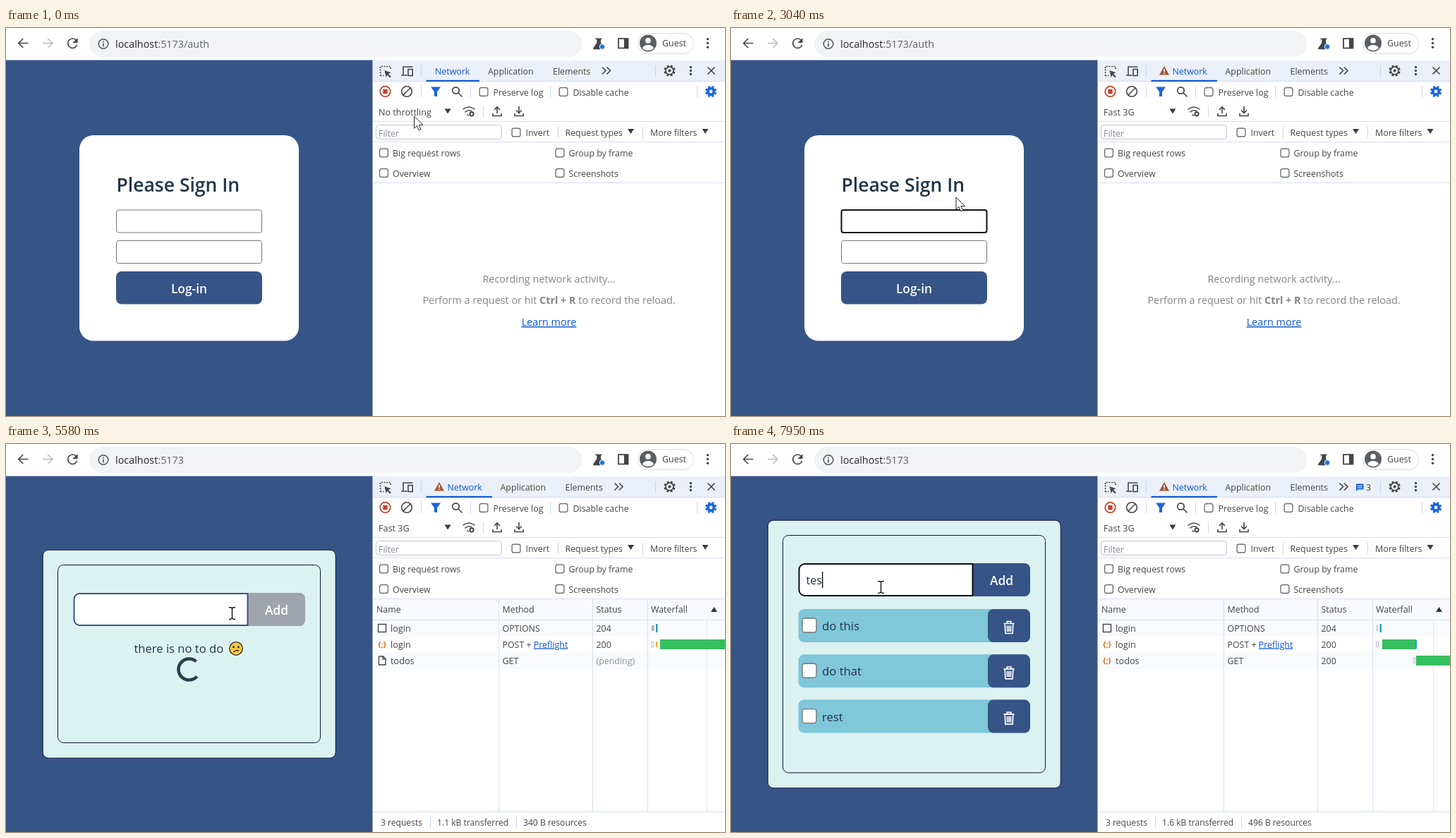
Animation, 1019 px wide and 550 px high, one loop 8000 ms. Source, as an HTML page:

```html
<!DOCTYPE html>
<html lang="en">
<head>
<meta charset="utf-8">
<title>Sign in and to-do list</title>
<style>
html, body { margin: 0; width: 100%; height: 100%; overflow: hidden; background: #fff; }
svg { display: block; width: 100vw; height: 100vh; }
text { font-family: "Open Sans", "Noto Sans", sans-serif; font-size: 12.4px; fill: #444; white-space: pre; }
.line { fill: none; stroke: #444; stroke-width: 1.6; }
.b { font-weight: 700; }
.semi { font-weight: 600; }
</style>
</head>
<body>
<svg id="stage" viewBox="0 0 1019 550"></svg>
<script>
const LOOP = 8000;
const NAVY = '#365486', MINT = '#dcf2f1', SKY = '#7fc7d9', INK = '#213547', EDGE = '#0f1035';
const BLUE = '#0b57d0', GREEN = '#34bf5e', GREY = '#a0a5ad', RULE = '#d5dff1';
const $ = id => document.getElementById(id);

// Drawing helpers
const text = (x, y, s, attrs = '') => `<text x="${x}" y="${y}" ${attrs}>${s}</text>`;
const rect = (x, y, w, h, fill, attrs = '') =>
  `<rect x="${x}" y="${y}" width="${w}" height="${h}" fill="${fill}" ${attrs}/>`;
const line = (d, attrs = '') => `<path class="line" d="${d}" ${attrs}/>`;
const shape = (d, fill, attrs = '') => `<path d="${d}" fill="${fill}" ${attrs}/>`;
const disc = (x, y, r, fill, attrs = '') => `<circle cx="${x}" cy="${y}" r="${r}" fill="${fill}" ${attrs}/>`;
const ring = (x, y, r, color, w) => disc(x, y, r, 'none', `stroke="${color}" stroke-width="${w}"`);
const split = (x, y, h = 16) => rect(x, y, 1, h, '#c6d8f5');
const check = (x, y) => rect(x + .6, y + .6, 11.8, 11.8, '#fff', 'rx="2.5" stroke="#5a5d61" stroke-width="1.2"');
const option = (x, y, s, gap = 20) => check(x, y) + text(x + gap, y + 11.5, s);
const tri = (x, y) => shape(`M${x} ${y}h9l-4.5 7z`, '#3c3c3c');
const dots = (x, y, step) => [-step, 0, step].map(d => disc(x, y + d, 1.7, '#444')).join('');
const gear = (x, y, color, w) => ring(x, y, 6.2 - w / 2, color, w) +
  disc(x, y, 7, 'none', `stroke="${color}" stroke-width="2.4" stroke-dasharray="3 2.5" transform="rotate(10 ${x} ${y})"`) +
  (w < 3 ? disc(x, y, 2, color) : '');

const browserBar = () => rect(0, 0, 1019, 45.5, '#fff') + rect(118, 4, 698, 37, '#f1f3f4', 'rx="18.5"') +
  line('M31.5 21.5H18M24.3 15l-6.6 6.5 6.6 6.5') +
  line('M52 21.5h13.5M59.2 15l6.6 6.5-6.6 6.5', 'style="stroke:#b9bcc0"') +
  line('M99.5 17.5a6.7 6.7 0 1 0 1.2 6.2') + shape('M101.5 14v7h-7z', '#444') +
  ring(138, 22.5, 6.8, '#50545a', 1.5) + rect(137.2, 21.5, 1.6, 5, '#50545a') + rect(137.2, 18.5, 1.6, 1.7, '#50545a') +
  `<text x="155" y="27.5" style="font-size:14.4px;fill:#27292c">localhost<tspan id="path" fill="#5f6368"></tspan></text>` +
  shape('M835.5 14.5h9v1.8h-1.5v4.7l5 7q1 2-1 2.2h-13.5q-2.5-.2-1-2.2l4.8-7v-4.7h-1.8z', '#42464b') +
  disc(845, 26.5, 3.8, '#1a73e8', 'stroke="#fff" stroke-width="1"') +
  rect(868, 15, 13.5, 13.5, 'none', 'stroke="#444" stroke-width="1.8"') + rect(876, 15, 5.5, 13.5, '#444') +
  rect(895.5, 7.5, 79, 29, '#fff', 'rx="14.5" stroke="#dadce0"') +
  disc(910, 21.5, 12, '#5a5e63') + disc(910, 17.8, 3.9, '#fff') + shape('M902 28.5q2-4.5 8-4.5t8 4.5q-3 3.2-8 3.2t-8-3.2z', '#fff') +
  text(930, 26, 'Guest') + dots(994.5, 21.5, 5.7);

const devtools = () => rect(519.5, 45, 500, 505, '#fff') + rect(520, 46, 499, 29.5, '#ebeff7') +
  [75, 132, 161, 219].map(y => rect(520, y, 499, 1, RULE)).join('') +
  line('M530.5 68v-13.5h14.5v4M530.5 67.5h5', 'stroke-dasharray="2 1.7"') +
  shape('M536.5 60l9 3.2-3.6 1.7 4 4-1.5 1.5-4-4-1.7 3.5z', '#444') +
  line('M563 66v-11h13.5M560 67h8.5') + rect(570, 58.5, 6.2, 9, 'none', 'stroke="#444" stroke-width="1.6"') +
  split(588, 53) + split(920, 53) +
  `<g id="tabs">` + text(608, 65.5, 'Network', `style="fill:${BLUE}"`) + text(683, 65.5, 'Application') +
  text(775, 65.5, 'Elements') + line('M845 55.5l5 5-5 5M851.5 55.5l5 5-5 5') + '</g>' +
  `<g id="warn">` + shape('M614 54l7 12.5h-14z', '#a4573a') + rect(613.3, 58, 1.5, 4.3, '#fff') + rect(613.3, 63.5, 1.5, 1.5, '#fff') + '</g>' +
  `<rect id="underline" x="595.5" y="73.8" height="2.2" fill="${BLUE}"/>` +
  `<g id="issues">` + shape('M886 56.5h10.5v8h-8l-2.5 2.5z', '#1a66e0') + line('M888 59.3h6.5M888 61.9h6.5', 'style="stroke:#fff;stroke-width:1"') +
  text(900, 66, '3') + '</g>' +
  gear(940.5, 60.5, '#444', 1.6) + dots(970.5, 60.5, 5) + line('M994.5 55.5l10 10m0-10l-10 10') +
  // Recording toolbar
  ring(537.5, 90, 7.3, '#c0432d', 1.7) + rect(534.3, 86.8, 6.4, 6.4, '#c0432d', 'rx="1"') +
  ring(568, 90, 7.3, '#444', 1.6) + line('M573.2 84.8l-10.4 10.4') +
  shape('M602 83.5h14l-5 7v6.5h-4v-6.5z', '#1a66e0') +
  ring(637.5, 88.5, 4.7, '#444', 1.7) + line('M641 92l5.5 5.5') +
  split(588, 82) + split(658, 82) + split(771, 82) + split(979, 82) +
  option(670.5, 84, 'Preserve log') + option(783.5, 84, 'Disable cache') + gear(999, 90, '#1a66e0', 3.8) +
  rect(522, 106, 112, 25, '#efefef', 'id="selectHover"') +
  `<text id="speed" x="528" y="123.5" style="font-size:12.6px"></text>` + tri(621.5, 114.5) +
  line('M647.5 115.5q8.5-7 17 0M650.5 119.3q5.5-4.5 10-1M653.5 122.5l2.5 2') +
  ring(660, 121.8, 2.6, '#444', 2) + split(676, 110) +
  line('M696 121v-8.5M692 116l4-4 4 4M690 121v3.5h12v-3.5') + line('M727 111v9M723 116.5l4 4 4-4M721 121v3.5h12v-3.5') +
  // Filters
  rect(524.5, 137.5, 178, 20, '#fff', 'rx="4" stroke="#c3c7cd"') + text(528, 153.5, 'Filter', 'style="fill:#85898e"') +
  option(716.5, 141.5, 'Invert') + split(782, 140) + text(792.5, 153, 'Request types') + tri(881, 143) +
  split(902, 140) + text(913, 153, 'More filters') + tri(986.5, 143) +
  option(529, 170.5, 'Big request rows', 19) + option(778.5, 170.5, 'Group by frame', 19) +
  option(529, 199, 'Overview', 19) + option(778.5, 199, 'Screenshots', 19) +
  `<g id="empty" text-anchor="middle">` +
  [[360.5, 'Recording network activity…', '#808488'],
   [391, 'Perform a request or hit <tspan class="b">Ctrl + R</tspan> to record the reload.', '#808488'],
   [422, 'Learn more', BLUE + ';text-decoration:underline']].map(([y, s, c]) =>
    text(769.5, y, s, `style="font-size:14.4px;fill:${c}"`)).join('') + '</g>' +
  `<g id="table"></g>`;

const loginPage = () => `<g id="login">` + rect(104, 152, 311, 291.5, '#fff', 'rx="20"') +
  text(156.5, 231.5, 'Please Sign In', `class="semi" style="font-size:26.5px;fill:${INK}"`) +
  [258, 301.5].map((y, i) => rect(156.5, y, 206, 32, '#fff', `id="field${i}" rx="3"`)).join('') +
  `<text id="user" x="161" y="280.5" style="font-size:16.2px;fill:#111"></text><g id="secret"></g>` +
  rect(156, 345, 207, 46.5, NAVY, 'rx="8"') +
  text(259.5, 375.5, 'Log-in', 'class="semi" text-anchor="middle" style="font-size:17.4px;fill:#fff"') + '</g>';

const trash = (x, y) => `<g transform="translate(${x} ${y})">` +
  line('M-7.5-5.5h15M-2.8-6v-2.3h5.6v2.3M-5.8-4.5l.7 13h10.2l.7-13M-2.6-2.5l.3 8.5M0-2.5v8.5M2.6-2.5l-.3 8.5',
    'style="stroke:#fff;stroke-width:1.7"') + '</g>';

const item = (name, i) => {
  const y = 234 + i * 64.3;
  return rect(95.5, y, 328.5, 47, SKY, 'rx="8"') + rect(364, y, 60, 47, NAVY, 'rx="8"') +
    rect(101, y + 13, 20, 20, '#fff', 'rx="3.5" stroke="#767676" stroke-width="1.4"') +
    text(129, y + 30, name, `style="font-size:16.7px;fill:${INK}"`) + trash(394, y + 26);
};

const worriedFace = (x, y) => disc(x, y, 9.3, '#fcc93c', 'stroke="#2b2b2b" stroke-width="1.3"') +
  disc(x - 3.4, y - 2.2, 1.5, '#2b2b2b') + disc(x + 3.4, y - 2.2, 1.5, '#2b2b2b') +
  line(`M${x - 3.5} ${y + 5}q3.5-3.5 7.5-2`, 'style="stroke:#2b2b2b"');

const todoPage = () => `<g id="todo">` +
  `<rect id="panel" x="52.2" y="108.2" width="415" rx="8" fill="${MINT}" stroke="${EDGE}"/>` +
  `<rect id="inner" x="73.5" y="129.5" width="372" rx="8" fill="none" stroke="${EDGE}"/>` +
  `<path id="add" d="M343 169h73a8 8 0 0 1 8 8v31a8 8 0 0 1-8 8h-73z"/>` +
  `<path id="entry" d="M342.5 170H104.5a8 8 0 0 0-8 8v29a8 8 0 0 0 8 8h238z" fill="#fff" stroke-width="2"/>` +
  text(383.5, 199.5, 'Add', 'class="semi" text-anchor="middle" style="font-size:17.3px;fill:#fff"') +
  `<text id="draft" x="106.5" y="199" style="font-size:16.2px;fill:${INK}"></text>` +
  `<g id="list">` + ['do this', 'do that', 'rest'].map(item).join('') + '</g>' +
  `<g id="loading">` + text(181.5, 254, 'there is no to do', `style="font-size:16.6px;fill:${INK}"`) + worriedFace(326, 248) +
  disc(259.5, 277.5, 15, 'none', `id="spinner" stroke="#2c3e50" stroke-width="4.6" pathLength="360" stroke-dasharray="270 90"`) + '</g></g>';

const choices = ['Disabled', 'No throttling', 'Presets', 'Fast 3G', 'Slow 3G', 'Offline', 'Custom', 'Add…'];
const headings = [0, 2, 6];
const choice = (s, i) => headings.includes(i)
  ? text(530, 144 + i * 18.17, s, 'class="b"')
  : text(543, 144 + i * 18.17, s, `id="choice${i}" style="font-size:12.6px"`);
const menu = () => `<g id="menu">` +
  rect(522.5, 129.5, 110, 147, '#fff', 'stroke="#7b7b7b" style="filter:drop-shadow(2px 2px 2px #0004)"') +
  `<rect id="pick" x="523" width="109" height="18.2" fill="#1765cf"/>` + choices.map(choice).join('') + '</g>';

$('stage').innerHTML = rect(0, 45, 520, 505, NAVY) + browserBar() + devtools() + loginPage() + todoPage() + menu() +
  rect(0, 0, 1.3, 23, '#000', 'id="caret"') + disc(0, 0, 13, '#dcdb20', 'id="halo" fill-opacity=".78"') +
  shape('M0 0V17.2l4-3.7 2.7 6.3 2.9-1.2-2.7-6.2h5.6z', '#fff', 'id="arrow" stroke="#222" stroke-width="1"') +
  `<path id="beam" d="M-4.5-8.5q4.5 0 4.5 2v13q0 2 4.5 2M4.5-8.5q-4.5 0-4.5 2v13q0 2-4.5 2" fill="none" stroke="#111" stroke-width="1.4"/>`;

// Network table
const marks = {
  box: y => rect(527.5, y - 5.5, 11, 11, 'none', 'stroke="#444" stroke-width="1.4"'),
  json: y => text(533, y + 3.6, '{;}', 'class="b" text-anchor="middle" style="font-size:11px;fill:#d9772b"'),
  page: y => line(`M528.5 ${y - 6}h6l3.5 3.5v8.5h-9.5zM534 ${y - 6}v4h4`, 'style="stroke-width:1.3"')
};

function table(stage, hover) {
  const done = stage == 3, wait = '(pending)';
  const rows = [
    ['box', 'login', 'OPTIONS', stage == 1 ? wait : 204],
    [stage == 1 ? 'page' : 'json', 'login', `POST + <tspan fill="${BLUE}" text-decoration="underline">Preflight</tspan>`, stage == 1 ? wait : 200],
    [done ? 'json' : 'page', 'todos', 'GET', done ? 200 : wait]
  ].slice(0, stage == 1 ? 2 : 3);
  const totals = [['0 B', '0 B'], ['1.1 kB', '340 B'], ['1.6 kB', '496 B']][stage - 1];
  const queue = (x, y) => rect(x + .5, y - 3.5, 3, 7, '#fff', 'stroke="#b9bdc2"');
  let out = rect(520, 220, 499, 330, '#fff') + rect(520, 220, 499, 29, '#f7f9fe');
  rows.forEach((r, i) => {
    const fill = i == hover ? '#f0f0f0' : i % 2 ? '#fff' : '#f8fafe';
    out += rect(520, 249.5 + i * 23, 499, 23, fill);
  });
  out += [698, 831, 909].map(x => rect(x, 220, 1, 301, RULE)).join('') + rect(done ? 995 : 993, 250, 1, 271, '#e2e8f3') +
    rect(520, 249, 499, 1, RULE) + rect(520, 521, 499, 1, RULE) +
    [[525, 'Name'], [703.5, 'Method'], [836.5, 'Status'], [914, 'Waterfall']].map(([x, s]) => text(x, 238.5, s)).join('') +
    shape('M999 238h9l-4.5-7z', '#333');
  rows.forEach(([mark, name, method, status], i) => {
    const y = 261 + i * 23;
    out += marks[mark](y) + text(545, y + 4.5, name, 'style="font-size:12.7px"') +
      text(703.5, y + 4.5, method) + text(836.5, y + 4.5, status, status == wait ? 'style="fill:#8d9196"' : '');
  });
  if (stage == 2) out += rect(915, 257, 3.5, 8, '#a9adb2') + rect(921, 255, 2.5, 12, '#2a9db5') +
    queue(914.5, 284) + rect(921, 280, 2, 8, '#f2a73b') + rect(927, 277, 92, 14, GREEN);
  if (done) out += rect(915, 257, 1.5, 8, '#b5b9be') + rect(919.5, 255, 2.5, 12, '#27a5d0') +
    queue(914, 284) + rect(923, 277, 48, 14, GREEN) + rect(969.5, 278, 2.5, 12, '#2d9fd8') +
    queue(966.5, 307) + rect(971, 300, 48, 14, GREEN);
  return out + [[531, rows.length + ' requests'], [611, totals[0] + ' transferred'], [733, totals[1] + ' resources']]
    .map(([x, s]) => text(x, 540.5, s, 'style="font-size:12.1px"')).join('') + split(601, 528) + split(723, 528);
}

// Timeline
const pointerKeys = [
  [0, 578.5, 125], [470, 578.5, 125], [750, 576, 195], [1830, 576, 195], [2200, 350, 360], [2570, 310, 269],
  [2770, 310, 269], [2840, 319, 240], [5500, 319, 240], [5510, 320.5, 240], [5640, 320.5, 240],
  [6270, 543, 276], [6330, 543, 276], [6520, 490, 296], [7030, 193.5, 202], [7820, 193.5, 202], [7950, 212.5, 203]
];
const clicks = [[270, 470], [1630, 1830], [2570, 2770], [7070, 7220]];
const userTyping = [[3310, 2], [3520, 3], [3660, 4]];
const secretTyping = [[4050, 1], [4180, 2], [4310, 3], [4450, 4]];
const draftTyping = [[7550, 1], [7620, 2], [7820, 3]];

const within = (t, a, b) => t >= a && t < b;
const typed = (keys, t) => keys.reduce((n, [at, len]) => t >= at ? len : n, 0);
const show = (id, on) => $(id).style.display = on ? '' : 'none';
const set = (id, attrs) => { for (const k in attrs) $(id).setAttribute(k, attrs[k]); };
const move = (id, x, y) => set(id, { transform: `translate(${x} ${y})` });

function pointerAt(t) {
  const i = pointerKeys.findIndex(k => k[0] > t);
  if (i < 0) return pointerKeys[pointerKeys.length - 1].slice(1);
  const [t0, x0, y0] = pointerKeys[i - 1], [t1, x1, y1] = pointerKeys[i];
  const u = (t - t0) / (t1 - t0), e = u * u * (3 - 2 * u);
  return [x0 + (x1 - x0) * e, y0 + (y1 - y0) * e];
}

let tableKey = '';
function render(t) {
  const [x, y] = pointerAt(t);
  const slow = t >= 1830, inside = t >= 5510, loaded = t >= 6120;
  const stage = t < 4920 ? 0 : !inside ? 1 : loaded ? 3 : 2;

  $('path').textContent = inside ? ':5173' : ':5173/auth';
  $('speed').textContent = slow ? 'Fast 3G' : 'No throttling';
  move('tabs', slow ? 17.5 : 0, 0);
  show('warn', slow);
  set('underline', { width: slow ? 93.5 : 75.5 });
  show('issues', t >= 6600);

  const open = within(t, 330, 1830);
  show('menu', open);
  show('selectHover', open);
  const over = Math.floor((y - 130.3) / 18.2), pick = over == 3 ? 3 : 1;
  set('pick', { y: 130.3 + pick * 18.2 });
  [1, 3].forEach(i => $('choice' + i).style.fill = i == pick ? '#fff' : '');

  show('empty', !stage);
  show('table', stage);
  const hover = x > 520 && y > 249.5 ? Math.floor((y - 249.5) / 23) : -1;
  const key = stage + ':' + hover;
  if (stage && key != tableKey) $('table').innerHTML = table(stage, hover);
  tableKey = key;

  show('login', !inside);
  show('todo', inside);
  const focus = within(t, 2570, 3790) ? 0 : within(t, 3790, 4920) ? 1 : -1;
  [0, 1].forEach(i => set('field' + i, { stroke: i == focus ? '#101010' : '#767676', 'stroke-width': i == focus ? 2 : 1 }));
  $('user').textContent = 'test'.slice(0, typed(userTyping, t));
  const hidden = typed(secretTyping, t);
  $('secret').innerHTML = Array.from({ length: hidden }, (_, i) => disc(165 + i * 7, 318.5, 2.6, '#111')).join('');

  const writing = t >= 7070, draft = typed(draftTyping, t);
  move('todo', 0, loaded ? 0 : 42);
  set('panel', { height: loaded ? 379.5 : 295 });
  set('inner', { height: loaded ? 336.5 : 252 });
  set('add', { fill: draft ? NAVY : GREY });
  set('entry', { stroke: writing ? '#0c0c14' : NAVY });
  $('draft').textContent = 'tes'.slice(0, draft);
  show('list', loaded);
  show('loading', !loaded);
  set('spinner', { transform: `rotate(${45 + (t - 5590) * .36} 259.5 277.5)` });

  show('caret', (focus == 0 && !within(t, 3040, 3310)) || focus == 1 || writing);
  if (focus == 0) move('caret', 161 + $('user').getComputedTextLength(), 262);
  if (focus == 1) move('caret', 161 + hidden * 7, 305.5);
  if (writing) move('caret', 106.5 + $('draft').getComputedTextLength(), 181);

  const onField = inside
    ? within(x, 95, 343) && (loaded ? within(y, 169, 216) : within(y, 211, 258))
    : within(x, 156, 363) && (within(y, 258, 290) || within(y, 301, 334));
  show('arrow', !onField);
  show('beam', onField);
  ['arrow', 'beam', 'halo'].forEach(id => move(id, x, y));
  show('halo', clicks.some(([a, b]) => within(t, a, b)));
}

const start = performance.now();
function tick() {
  render((performance.now() - start) % LOOP);
  requestAnimationFrame(tick);
}
tick();
</script>
</body>
</html>
```
